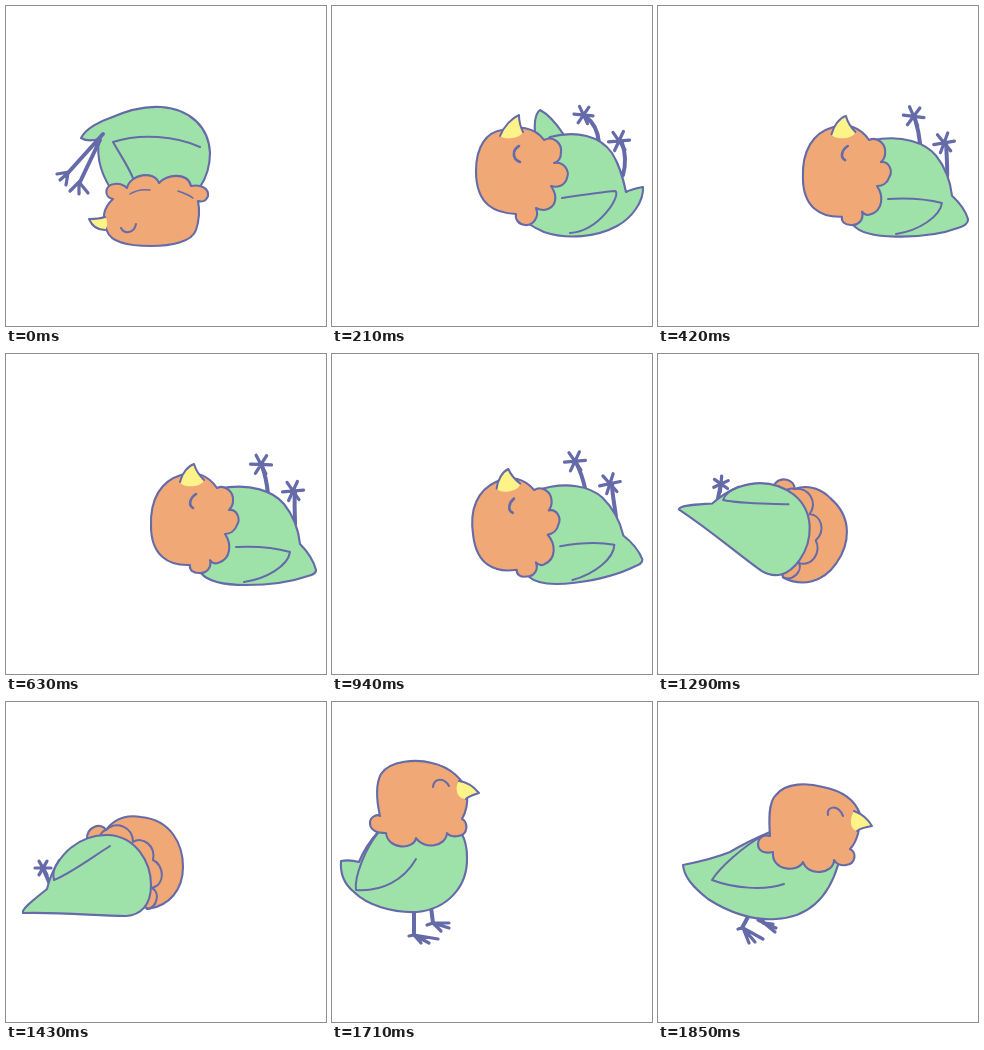
Write an HTML page that moves like this. It is 320 px wide and 320 px high and loops after 1920 ms.

```html
<!DOCTYPE html>
<html lang="en">
<head>
<meta charset="utf-8">
<title>Tumbling bird</title>
<style>
  html, body { margin: 0; width: 100%; height: 100%; overflow: hidden; background: #fff; }
  svg { display: block; width: 100%; height: 100%; }
  path { stroke-linecap: round; stroke-linejoin: round; }
</style>
</head>
<body>
<svg viewBox="0 0 320 320"><g id="bird"></g></svg>
<script>
const INK = '#656aa8';
const STYLES = {
  green: ['#9ee2aa', INK, 2.1],
  orange: ['#f0a877', INK, 2.1],
  beak: ['#fef388', 'none', 0],
  line: ['none', INK, 2],
  fine: ['none', INK, 1.5],
  eye: ['none', INK, 2.6],
  leg: ['none', INK, 4],
  toes: ['none', INK, 3.2]
};

// Six toes spread around the end of a leg.
function star(x, y, r, turn) {
  let d = '';
  for (let i = 0; i < 3; i++) {
    const a = (turn + i * 60) * Math.PI / 180;
    const dx = r * Math.cos(a), dy = r * Math.sin(a);
    d += `M${(x - dx).toFixed(1)},${(y - dy).toFixed(1)}L${(x + dx).toFixed(1)},${(y + dy).toFixed(1)}`;
  }
  return d;
}

// The last curve of a beak lies on the face and has no outline.
const beak = d => [['beak', d], ['line', d.slice(0, d.lastIndexOf('C'))]];

const headstand = { pivot: [145, 170], parts: [
  ['green', 'M75,132C80,122 95,115 104,112C122,104 140,100 155,101C185,103 203,122 204,147C204,162 200,172 194,181L110,190C96,172 90,152 93,133C86,135 80,135 75,132Z'],
  ['line', 'M194,141C170,130 135,127 107,136C115,150 122,160 127,172'],
  ['leg', 'M97,128L61,168M94,134L73,178'],
  ['toes', 'M63,166L51,168M62,167L54,174M62,167L60,179M73,176L64,185M73,176L73,188M73,176L82,187'],
  ['orange', 'M107,193C98,192 98,179 108,178C114,177 118,179 121,182C124,168 148,164 153,177C160,168 182,166 185,180C196,178 203,183 202,190C200,196 195,196 192,195C194,205 193,215 190,224C186,236 165,240 145,240C120,240 105,236 101,225C95,212 97,202 107,193Z'],
  ['fine', 'M124,188C130,184 137,183 144,184M172,185C178,187 183,189 187,192'],
  ...beak('M99,211C93,213 88,213 83,213C86,220 92,224 99,224C102,220 102,214 99,211'),
  ['line', 'M115,222C118,228 128,228 130,218']
] };

const landed = { pivot: [225, 170], parts: [
  ['leg', 'M267,137C266,125 261,116 254,111'],
  ['toes', star(251.5, 109, 9.5, 5)],
  ['leg', 'M291,169C294,158 294,148 290,137'],
  ['toes', star(287, 135, 10.5, -5)],
  ['green', 'M203,128C202,115 204,107 208,104C218,109 226,120 232,129L215,140Z'],
  ['green', 'M218,131C245,124 268,130 280,147C288,160 291,172 294,186C300,183 306,182 311,181C312,195 300,212 285,220C265,231 235,234 212,226C205,223 200,220 197,218L185,170Z'],
  ['line', 'M230,192C250,189 270,186 283,185C290,188 268,225 238,227'],
  ['orange', 'M184,208C164,207 144,200 144,165C144,140 155,126 170,124C185,119 203,121 212,134C222,129 230,138 229,146C229,152 226,156 222,157C232,155 238,165 235,172C233,180 225,182 219,180C226,190 225,202 212,204C209,204 206,203 204,202C208,212 200,220 193,219C186,218 183,213 184,208Z'],
  ...beak('M168,130C172,120 180,112 187,109C187,117 189,122 191,126C188,133 172,134 168,130'),
  ['eye', 'M187,140C180,144 180,153 188,156']
] };

const resting = twitch => ({ pivot: [225, 175], parts: [
  ['leg', `M262,140C261,130 259,120 ${256 + twitch},112`],
  ['toes', star(255 + twitch, 110.5, 10.5, 2 + 5 * twitch)],
  ['leg', `M289,170C289,158 288,148 ${289 - twitch},138`],
  ['toes', star(287 - twitch, 137, 10.5, -5 - 5 * twitch)],
  ['green', 'M206,140C206,138 206,136 207,136C215,138 218,140 220,142L215,150Z'],
  ['green', 'M212,135C245,128 268,138 278,150C290,165 293,180 294,190C302,198 308,208 310,216C310,220 306,221 302,222C285,228 268,231 240,231C220,231 202,228 195,219L185,170Z'],
  ['line', 'M230,193C250,192 270,194 284,198C282,212 260,225 238,228'],
  ['orange', 'M184,211C162,212 145,201 145,172C144,145 155,127 175,121C190,116 203,122 211,134C219,130 228,138 227,147C227,151 225,154 223,156C231,155 235,165 231,171C229,177 224,180 219,180C226,190 225,205 212,209C209,210 206,209 204,206C206,214 200,220 193,219C187,219 183,216 184,211Z'],
  ...beak('M174,128C176,119 182,112 188,110C190,117 194,122 198,126C196,134 176,134 174,128'),
  ['eye', 'M190,140C184,144 182,151 187,154']
] });

const rolling = { pivot: [195, 187], parts: [
  ['beak', 'M137,160L127,171L142,179Z'],
  ['line', 'M137,160L127,171L142,179'],
  ['orange', 'M147,192C139,193 138,184 141,181C133,162 136,122 172,120C190,119 200,128 206,134C214,132 220,136 221,143L190,180Z'],
  ['green', 'M190,137C200,134 212,138 219,141C230,139 246,140 250,145C250,155 245,165 241,173C247,205 228,236 195,236C165,236 146,210 146,185C146,155 165,140 190,137Z'],
  ['green', 'M155,157C154,140 168,131 182,132C198,132 204,142 202,152C200,163 200,172 195,178Q175,169 155,157Z'],
  ['fine', 'M223,166L232,168M229,161L227,173'],
  ['leg', 'M165,173L141,168M192,212L169,231'],
  ['toes', 'M140,167L134,162M140,167L131,172M140,167L139,175M140,167L147,161M168,231L156,229M168,231L158,238M168,231L167,242M168,231L180,234M168,231L168,223']
] };

const turned = { pivot: [97, 168], parts: [
  ['leg', 'M37,166L43,180'],
  ['toes', star(37, 166, 8, 0)],
  ['orange', 'M81,138C80,124 96,120 100,128C110,114 125,113 135,115C165,118 177,142 177,165C177,188 163,204 142,207L100,180Z'],
  ['line', 'M100,128C110,118 127,125 127,140C136,134 150,143 147,158C158,163 160,182 146,186C154,190 152,205 141,207M100,128Q96,129 94,134'],
  ['green', 'M41,187C50,150 75,132 103,133C130,135 145,160 145,183C145,203 135,213 120,214C90,214 60,210 17,211C15,207 30,196 41,187Z'],
  ['line', 'M104,144C85,156 65,171 48,178C46,172 49,164 53,158']
] };

const standing = { pivot: [85, 238], parts: [
  ['leg', 'M82,207L82,233M99,205L101,221'],
  ['toes', 'M82,233L106,237M82,233L97,241M82,233L89,241M82,233L77,234M101,221L117,221M101,221L117,226M101,221L109,229M101,221L95,223'],
  ['green', 'M46,130C37,140 31,150 27,160C20,158 14,158 9,159C8,172 12,182 22,190C35,203 60,211 85,210C115,207 136,185 135,155C135,145 133,138 130,132L90,90Z'],
  ['line', 'M84,157C72,178 50,190 24,188C22,175 34,145 46,131'],
  ['orange', 'M48,114C46,105 42,85 49,72C58,58 85,57 100,61C118,65 133,78 135,92C136,102 134,110 130,117C136,119 137,133 126,134C122,135 117,134 115,131C114,145 92,148 84,136C82,148 56,148 54,131C46,131 38,129 38,121C38,114 46,112 48,114Z'],
  ...beak('M127,79C135,80 142,85 147,91C141,93 137,94 134,97C125,97 122,86 127,79'),
  ['line', 'M101,85C102,76 112,75 117,84']
] };

const leaning = { pivot: [100, 238], parts: [
  ['leg', 'M91,213L84,226M100,213L106,221'],
  ['toes', 'M85,226L105,237M85,226L97,240M85,226L91,241M84,226L80,227M106,221L115,222M106,221L118,226M106,221L117,230M106,221L100,218'],
  ['green', 'M112,130C98,136 85,142 72,150C55,157 40,160 25,163C26,175 35,185 50,197C70,210 95,219 118,217C155,215 172,190 180,163C181,160 182,156 182,152L150,120Z'],
  ['line', 'M126,182C105,189 75,186 54,178C62,165 85,145 104,134'],
  ['orange', 'M112,134C111,120 110,100 118,93C128,80 150,81 165,85C185,89 197,98 202,112C203,125 199,140 192,147C199,150 198,162 188,163C183,164 178,162 176,158C176,172 150,175 145,160C140,171 113,169 115,150C106,152 100,149 100,142C100,135 107,132 112,134Z'],
  ...beak('M196,109C204,112 210,117 214,124C208,125 203,126 199,129C191,127 192,115 196,109'),
  ['line', 'M170,113C168,104 180,102 185,114']
] };

function mixPath(a, b, k) {
  const target = b.match(/-?[\d.]+/g);
  let i = 0;
  return a.replace(/-?[\d.]+/g, n => (+n + (target[i++] - n) * k).toFixed(2));
}

const mix = (a, b, k) => ({
  pivot: a.pivot,
  parts: a.parts.map(([style, d], i) => [style, mixPath(d, b.parts[i][1], k)])
});

// Each step: pose, turn in degrees, shift x and y, scale x and y.
const STEPS = [
  [headstand],
  [headstand, 30, 25, 3],
  [landed, -30, -25, 0],
  [landed],
  [mix(landed, resting(2), 0.4)],
  [mix(landed, resting(-1), 0.75)],
  [mix(landed, resting(1), 0.92)],
  [resting(-2)],
  [resting(1.5)],
  [resting(0)],
  [resting(0), -7, -4, 0],
  [rolling, 15, 26, -2],
  [rolling],
  [rolling, -40, -28, 2],
  [rolling, -80, -60, 0],
  [turned, 35, 14, -2],
  [turned, 12, 5, 0],
  [turned],
  [turned, -10, 0, -2],
  [standing, 0, 0, 0, 1.06, 0.74],
  [standing, 0, 0, 0, 1.05, 0.93],
  [standing],
  [mix(standing, leaning, 0.45)],
  [leaning]
];
const STEP = 70, REST = 9, REST_TIME = 310, LOOP = 1920;
const bird = document.getElementById('bird');

function stepAt(t) {
  if (t < REST * STEP) return Math.floor(t / STEP);
  return REST + Math.max(0, Math.floor((t - REST * STEP - REST_TIME) / STEP) + 1);
}

let shown = -1;
function render(t) {
  const index = stepAt(t % LOOP);
  if (index === shown) return;
  shown = index;
  const [pose, turn = 0, dx = 0, dy = 0, sx = 1, sy = 1] = STEPS[index];
  const [px, py] = pose.pivot;
  bird.setAttribute('transform',
    `translate(${px + dx} ${py + dy}) rotate(${turn}) scale(${sx} ${sy}) translate(${-px} ${-py})`);
  bird.innerHTML = pose.parts.map(([style, d]) => {
    const [fill, stroke, width] = STYLES[style];
    return `<path d="${d}" fill="${fill}" stroke="${stroke}" stroke-width="${width}"/>`;
  }).join('');
}

let start;
function tick(now) {
  start ??= now;
  render(now - start);
  requestAnimationFrame(tick);
}
render(0);
requestAnimationFrame(tick);
</script>
</body>
</html>
```
